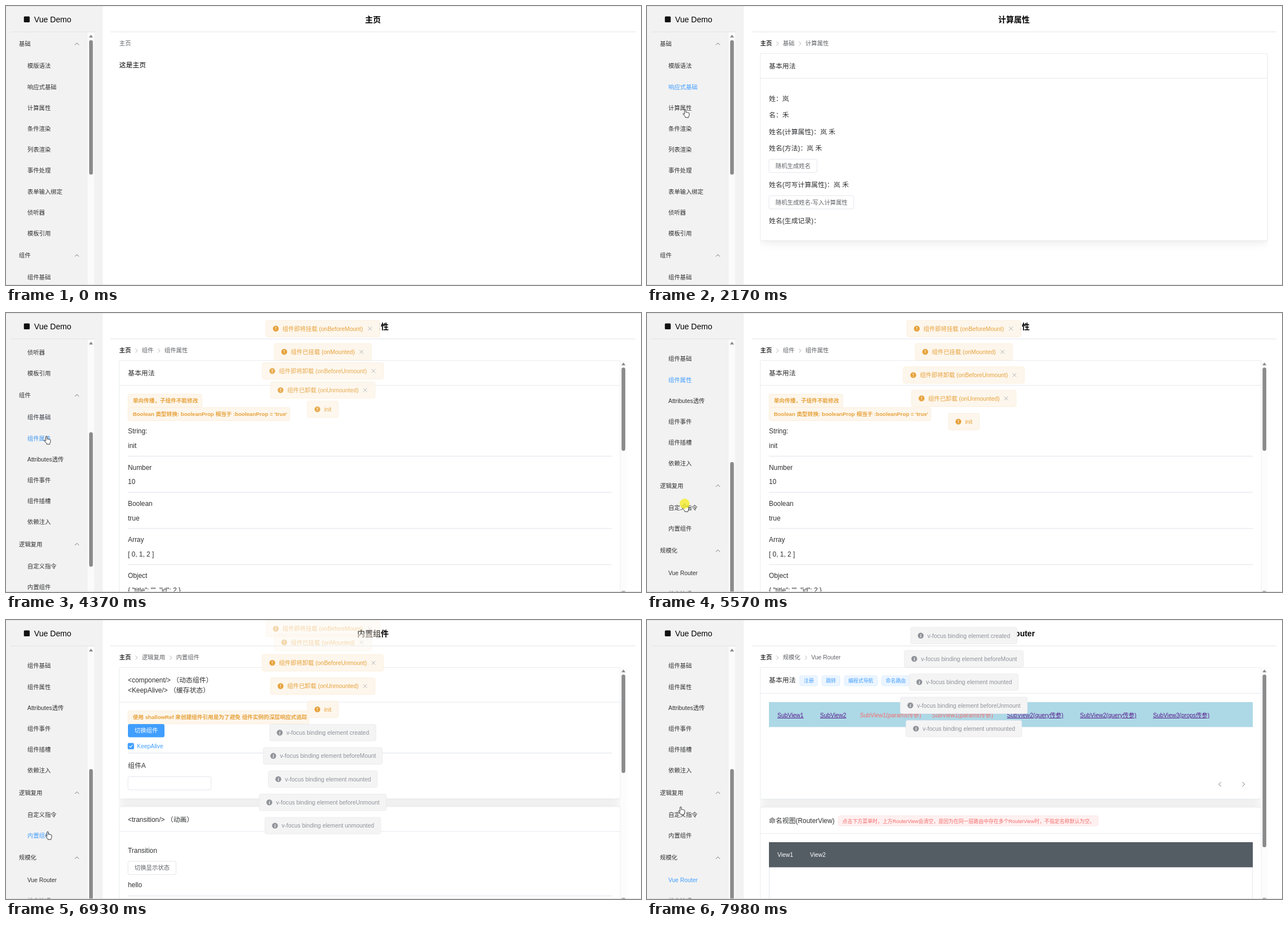
An HTML page for the animation above (8000 ms loop, 1130 by 496 pixels).

```html
<!DOCTYPE html>
<html lang="zh-CN">
<head>
<meta charset="utf-8">
<title>Vue Demo</title>
<style>
  html, body { margin: 0; width: 100%; height: 100%; overflow: hidden; background: #fff; }
  svg { display: block; width: 100vw; height: 100vh; }
  text { font-family: "Liberation Sans", "Noto Sans CJK SC", "Noto Sans CJK", sans-serif; white-space: pre; }
  .card { fill: #fff; stroke: #e4e7ed; filter: drop-shadow(0 0 9px rgba(0, 0, 0, .12)); }
</style>
</head>
<body>
<svg id="stage" viewBox="0 0 1130 496"></svg>
<script>
const LOOP = 8000;
const INK = '#303133', GREY = '#606266', BLUE = '#409eff', ORANGE = '#e6a23c', RED = '#f56c6c';
const SMALL = 10.4, BODY = 11.9, TINY = 8.93;

// ---------- drawing helpers (text is placed by its vertical centre) ----------
const escapeText = s => s.replace(/&/g, '&amp;').replace(/</g, '&lt;');
const text = (x, y, s, size = BODY, fill = INK, more = '') =>
  `<text x="${x}" y="${y + size * .37}" font-size="${size}" fill="${fill}" ${more}>${escapeText(s)}</text>`;
const box = (x, y, w, h, fill, stroke = 'none', r = 3) =>
  `<rect x="${x}" y="${y}" width="${w}" height="${h}" rx="${r}" fill="${fill}" stroke="${stroke}" stroke-width=".8"/>`;
const line = (x1, x2, y, color = '#dcdfe6') => `<path d="M${x1} ${y}H${x2}" stroke="${color}" stroke-width=".9"/>`;
const stroke = (d, color, w = .9) => `<path d="${d}" fill="none" stroke="${color}" stroke-width="${w}"/>`;
const bold = 'font-weight="700"';

const chevronRight = (x, y, s, color) => stroke(`M${x - s / 2} ${y - s}l${s} ${s}l${-s} ${s}`, color);
const card = (y, bottom, headerLine, right = 1104) =>
  `<rect class="card" x="201.5" y="${y}" width="${right - 201.5}" height="${bottom - y}" rx="3" stroke-width=".8"/>` +
  line(201.5, right, headerLine, '#e4e7ed');
const button = (x, y, w, label) => box(x, y, w, 23.6, '#fff', '#dcdfe6') + text(x + 11.8, y + 11.6, label, SMALL, GREY);
const alertBox = (y, w, label) =>
  box(217, y, w, 23.4, '#fdf6ec', '#faecd8') + text(225.7, y + 11.6, label, 9.67, ORANGE, bold);
const arrowUp = (x, y) => `<path d="M${x - 3.6} ${y + 2.6}L${x} ${y - 2.6}L${x + 3.6} ${y + 2.6}Z" fill="#8b8b8b"/>`;
const scrollbar = thumb => box(1093.5, 84, 11, 412, '#fcfcfc', 'none', 0) + arrowUp(1098.7, 90.5) +
  box(1095.4, 97, 6.6, thumb, '#8b8b8b', 'none', 3.3) +
  '<path d="M1095.2 494h7l-3.5 5z" fill="#8b8b8b"/>';

// ---------- pages ----------
const counters = y => [217, 358.3, 499.4].map(x => button(x, y, 132, 'You clicked me 0 times.')).join('');

const computedPage = () => card(84.5, 417, 128.5) + text(217, 107, '基本用法') +
  [[165, '姓：岚'], [194, '名：禾'], [223.5, '姓名(计算属性)：岚 禾'], [253, '姓名(方法)：岚 禾'],
   [317.5, '姓名(可写计算属性)：岚 禾'], [382, '姓名(生成记录)：']].map(([y, s]) => text(217, y, s)).join('') +
  button(217, 272.4, 85.6, '随机生成姓名') + button(217, 337.2, 151, '随机生成姓名-写入计算属性');

const basicsPage = () => card(84.5, 183, 128.5) + text(217, 107, 'SFC单组件') + counters(144) +
  card(197.3, 320, 241.5) + text(217, 220, 'Js对象定义组件') + counters(280.6) +
  card(333.8, 426.5, 378.5) + text(217, 357, '全局注册组件') + text(217, 403, '这是个全局组件');

const propsPage = () => card(84.5, 560, 128.5, 1093) + text(217, 107, '基本用法') +
  alertBox(144.2, 131.5, '单向传播，子组件不能修改') +
  alertBox(168, 288, "Boolean 类型转换: booleanProp 相当于 :booleanProp = 'true'") +
  [['String:', 'init'], ['Number', '10'], ['Boolean', 'true'], ['Array', '[ 0, 1, 2 ]'],
   ['Object', '{ "title": "", "id": 2 }']].map(([type, value], i) => {
    const y = 210 + 64.25 * i;
    return text(217, y, type) + text(217, y + 25.6, value) + line(217, 1078, y + 44.5);
  }).join('') + scrollbar(148);

const builtinPage = () => card(84.5, 318, 146, 1093) +
  text(217, 107, '<component/> （动态组件）') + text(217, 124.6, '<KeepAlive/> （缓存状态）') +
  alertBox(161.3, 322, '使用 shallowRef 来创建组件引用是为了避免 组件实例的深层响应式追踪') +
  box(217, 185, 65, 23.6, BLUE) + text(228.8, 196.5, '切换组件', SMALL, '#fff', 'font-weight="500"') +
  box(217, 219, 10.4, 10.4, BLUE, BLUE, 1.5) + stroke('M219.4 224.2l2 2.2l3.8 -4.2', '#fff', 1.1) +
  text(233, 223.8, 'KeepAlive', SMALL, BLUE) + line(217, 1078, 236.5) +
  text(217, 258.5, '组件A') + box(217, 278.5, 148, 23.4, '#fff', '#dcdfe6') +
  card(331.8, 560, 376, 1093) + text(217, 355, '<transition/> （动画）') + text(217, 410, 'Transition') +
  button(217, 429, 85.6, '切换显示状态') + text(217, 471, 'hello') + line(217, 1078, 490.5) + scrollbar(175);

const routerPage = () => card(84.5, 318.5, 130.3, 1093) + text(217, 107, '基本用法') +
  [[271.8, 31.8, '注册'], [311.2, 32, '跳转'], [351, 59, '编程式导航'], [417.6, 50.5, '命名路由']]
    .map(([x, w, s]) => box(x, 99, w, 18, '#ecf5ff', '#d9ecff') + text(x + 7.2, 108, s, TINY, BLUE)).join('') +
  box(217, 146, 861, 44.3, '#add8e6', 'none', 0) +
  [[232, 'SubView1'], [308, 'SubView2'], [379, 'SubView1(params传参)'], [507, 'SubView1(params传参)'],
   [640.6, 'SubView2(query传参)'], [770.6, 'SubView2(query传参)'], [900.6, 'SubView3(props传参)']]
    .map(([x, s]) => s.includes('params') ? text(x, 169, s, SMALL, RED)
      : text(x, 169, s, SMALL, '#551a8b', 'text-decoration="underline"')).join('') +
  stroke('M1021.5 288l-4 4l4 4', GREY) + chevronRight(1061.5, 292, 4, GREY) +
  card(332.8, 560, 379.5, 1093) + text(217, 356.8, '命名视图(RouterView)') +
  box(340.4, 348, 462.5, 18, '#fef0f0', '#fde2e2') +
  text(347.8, 357.2, '点击下方菜单时，上方RouterView会清空，是因为在同一层路由中存在多个RouterView时，不指定名称默认为空。', TINY, RED) +
  box(217.4, 430, 860.2, 90, '#fff', '#dcdfe6', 0) + box(217, 395, 861, 44.6, '#545c64', 'none', 0) +
  text(232, 417, 'View1', SMALL, '#fff') + text(290, 417, 'View2', SMALL, '#fff') + scrollbar(307);

const simplePage = bottom => () => card(84.5, bottom, 128.5) + text(217, 107, '基本用法');

const pages = [
  { at: 0, path: [], title: '主页', body: () => text(201.5, 105, '这是主页', BODY, '#000') },
  { at: 1100, path: ['基础'], title: '模版语法', body: simplePage(560) },
  { at: 1560, path: ['基础'], title: '响应式基础', body: simplePage(417) },
  { at: 2160, path: ['基础'], title: '计算属性', body: computedPage },
  { at: 3510, path: ['组件'], title: '组件基础', body: basicsPage },
  { at: 4150, path: ['组件'], title: '组件属性', body: propsPage },
  { at: 5630, path: ['逻辑复用'], title: '自定义指令', body: simplePage(318) },
  { at: 6060, path: ['逻辑复用'], title: '内置组件', body: builtinPage },
  { at: 7640, path: ['规模化'], title: 'Vue Router', body: routerPage },
];

function pageMarkup({ path, title, body }) {
  let x = 201.5, crumbs = '';
  const trail = path.length ? ['主页', ...path, title] : [title];
  trail.forEach((name, i) => {
    const home = trail.length > 1 && i === 0;
    crumbs += text(x, 66.5, name, SMALL, home ? INK : GREY, home ? bold : '');
    x += name.length * SMALL + 19.4;
    if (i < trail.length - 1) crumbs += chevronRight(x - 9.6, 67, 3.6, '#a8abb2');
  });
  return `<g class="page">${text(653, 23.5, title, 14, '#000', bold + ' text-anchor="middle"')}${crumbs}
    <g clip-path="url(#mainClip)">${body()}</g></g>`;
}

// ---------- side menu ----------
const menu = {
  基础: ['模版语法', '响应式基础', '计算属性', '条件渲染', '列表渲染', '事件处理', '表单输入绑定', '侦听器', '模板引用'],
  组件: ['组件基础', '组件属性', 'Attributes透传', '组件事件', '组件插槽', '依赖注入'],
  逻辑复用: ['自定义指令', '内置组件'],
  规模化: ['Vue Router', '状态管理'],
};
function menuMarkup() {
  let y = 67.3, out = '';
  for (const [group, items] of Object.entries(menu)) {
    out += text(23, y, group, SMALL) + stroke(`M122.6 ${y + 2}l3.6 -3.6l3.6 3.6`, GREY);
    y += 39.25;
    items.forEach((name, i) => {
      out += text(38, y, name, SMALL, INK, `data-item="${name}"`);
      y += i < items.length - 1 ? 37.2 : 39.25;
    });
  }
  return out;
}

// ---------- messages ----------
const PITCH = 41.35, FIRST_Y = 27.7, HEIGHT = 29.4;
const batches = [
  { at: 3550, close: 6830, items: [['组件即将挂载 (onBeforeMount)', 203], ['组件已挂载 (onMounted)', 173]] },
  { at: 4190, close: 7175, items: [['组件即将卸载 (onBeforeUnmount)', 215.5], ['组件已卸载 (onUnmounted)', 186], ['init', 55]] },
  { at: 5660, items: [['v-focus binding element created', 189], ['v-focus binding element beforeMount', 212], ['v-focus binding element mounted', 194]] },
  { at: 6090, items: [['v-focus binding element beforeUnmount', 226], ['v-focus binding element unmounted', 206]] },
];
const messages = [];
batches.forEach(batch => {
  const first = messages.length;
  batch.items.forEach(([label, width], k) => messages.push({ batch, first, k, label, width }));
});
function messageMarkup({ label, width }) {
  const info = label.startsWith('v-'), color = info ? '#909399' : ORANGE, left = 563.8 - width / 2, right = left + width;
  const mark = info ? '<path d="M.4 -2.8v1M-.4 -.7h.8l-.5 3.4h.8" ' : '<path d="M0 -3v3.4M0 1.7v1.2" ';
  return `<g class="message">` +
    (info ? box(left, -HEIGHT / 2, width, HEIGHT, '#f4f4f5', '#e9e9eb') : box(left, -HEIGHT / 2, width, HEIGHT, '#fdf6ec', '#faecd8')) +
    `<g transform="translate(${left + 17.8})"><circle r="5.2" fill="${color}"/>${mark} fill="none" stroke="#fff" stroke-width="1.1"/></g>` +
    text(left + 29.6, 0, label, SMALL, color) +
    (label.startsWith('组件') ? stroke(`M${right - 21} -3.3l6.6 6.6m0 -6.6l-6.6 6.6`, '#a8abb2') : '') + '</g>';
}

// ---------- scene ----------
const stage = document.getElementById('stage');
stage.innerHTML = `
  <clipPath id="mainClip"><rect x="201" y="84" width="904" height="412"/></clipPath>
  <clipPath id="menuClip"><rect y="47" width="172" height="449"/></clipPath>
  <rect width="1130" height="496" fill="#fff"/><rect width="172" height="496" fill="#f2f2f2"/>
  ${box(31.8, 18.6, 10.4, 10.4, '#111', 'none', 1.5)}${text(50, 23.6, 'Vue Demo', 14.1, '#000')}
  ${line(8, 158, 46)}${line(186, 1120, 46)}
  <g clip-path="url(#menuClip)">
    <g id="menu">${menuMarkup()}</g>
    ${box(145.3, 47, 11.7, 449, '#fbfbfb', 'none', 0)}${arrowUp(151.2, 53.5)}
    <g id="thumb">${box(148, 60.8, 6.6, 239, '#8b8b8b', 'none', 3.3)}</g>
  </g>
  ${pages.map(pageMarkup).join('')}
  ${messages.map(messageMarkup).join('')}
  ${line(0, 1130, .6, '#e2e2e2')}${line(0, 1130, 495.4, '#dcdcdc')}
  <g id="cursor" stroke="#222" stroke-width=".9" stroke-linejoin="round" fill="#fff">
    <path id="arrow" d="M0 0v11.5l2.7 -2.5l1.8 4l1.8 -.8l-1.8 -3.9h3.6z"/>
    <path id="hand" d="M-1.2 .8q1.2 -1.7 2.4 0v4.4q1 -1 2 .2q1 -.8 2 .4q1.4 -.6 1.9 .8v3.2q0 1.7 -1.2 3v1.4h-5.6v-1.2l-4 -4.6q-.6 -1.6 1 -1.3l1.5 1.4z"/>
    <circle id="press" r="9" fill="#f5ee2c" fill-opacity=".8" stroke="none"/>
  </g>`;

const $ = id => document.getElementById(id);
const pageNodes = stage.querySelectorAll('.page');
const messageNodes = stage.querySelectorAll('.message');
const itemNodes = [...stage.querySelectorAll('[data-item]')];

// ---------- motion ----------
const clamp = v => Math.min(1, Math.max(0, v));
const mix = (a, b, p) => a + (b - a) * p;
// CSS "ease": cubic-bezier(.25, .1, .25, 1)
function ease(v) {
  const x = clamp(v);
  if (x === 0 || x === 1) return x;
  let lo = 0, hi = 1, s;
  for (let i = 0; i < 18; i++) {
    s = (lo + hi) / 2;
    const bx = .75 * s * (1 - s) + s ** 3;
    if (bx < x) lo = s; else hi = s;
  }
  return .3 * s * (1 - s) ** 2 + 3 * s * s * (1 - s) + s ** 3;
}
const wheel = [[2480, 99], [2750, 99], [3050, 99], [4550, 104]];
const scrollAt = t => wheel.reduce((sum, [at, d]) => sum + d * ease((t - at) / 220), 0);

// time, x, y of the pointer tip
const route = [
  [110, 1122, 470], [860, 96, 116], [1000, 74, 106], [1120, 74, 106], [1430, 68, 143], [1600, 68, 143],
  [2060, 68, 184], [2560, 68, 184], [3300, 70, 183], [3520, 70, 183], [3620, 72, 218], [5100, 72, 220],
  [5500, 67, 339], [5650, 67, 339], [5920, 66, 378], [6090, 66, 378], [6500, 76, 362], [6800, 76, 362],
  [7340, 64, 457], [7660, 64, 457], [7970, 60, 332],
];
function pointerAt(t) {
  const i = route.findIndex(p => p[0] > t);
  if (i < 0) return route.at(-1).slice(1);
  const a = route[Math.max(0, i - 1)], b = route[i];
  const p = clamp((t - a[0]) / (b[0] - a[0])), q = p * p * (3 - 2 * p);
  return [mix(a[1], b[1], q), mix(a[2], b[2], q)];
}

const activeLevel = (t, page, next) =>
  ease((t - page.at - 20) / 300) * (1 - (next ? ease((t - next.at - 20) / 300) : 0));
const blend = p => `rgb(${[[48, 64], [49, 158], [51, 255]].map(([a, b]) => Math.round(mix(a, b, p)))})`;

function placeMessage(node, m, index, t) {
  const { at, close = Infinity } = m.batch;
  const shown = t >= at && t < close + 400;
  node.style.display = shown ? '' : 'none';
  if (!shown) return;
  const closed = batches.reduce((n, b) =>
    b.close && b !== m.batch ? n + b.items.length * ease((t - b.close) / 400) : n, 0);
  const home = FIRST_Y + PITCH * (index - closed);
  const start = FIRST_Y + PITCH * m.first + 11.9 * m.k - HEIGHT;
  const entering = mix(start, home, ease((t - at) / 400));
  const y = mix(entering, FIRST_Y - HEIGHT, ease((t - close) / 400));
  node.setAttribute('transform', `translate(0 ${y})`);
  node.setAttribute('opacity', ease((t - at) / 300) * (1 - ease((t - close) / 300)));
}

function render(t) {
  const current = pages.findLastIndex(p => t >= p.at);
  pageNodes.forEach((n, i) => n.style.display = i === current ? '' : 'none');

  const scroll = scrollAt(t);
  $('menu').setAttribute('transform', `translate(0 ${-scroll})`);
  $('thumb').setAttribute('transform', `translate(0 ${scroll * .509})`);
  itemNodes.forEach(n => {
    const i = pages.findIndex(p => p.title === n.dataset.item);
    n.setAttribute('fill', i < 0 ? INK : blend(activeLevel(t, pages[i], pages[i + 1])));
  });

  messages.forEach((m, i) => placeMessage(messageNodes[i], m, i, t));

  const [x, y] = pointerAt(t);
  const overMenu = x < 145;
  $('cursor').style.display = t < 110 ? 'none' : '';
  $('cursor').setAttribute('transform', `translate(${x} ${y})`);
  $('arrow').style.display = overMenu ? 'none' : '';
  $('hand').style.display = overMenu ? '' : 'none';
  $('press').style.display = pages.some(p => p.at && t >= p.at - 130 && t < p.at) ? '' : 'none';
}

const begin = performance.now();
(function frame() {
  render((performance.now() - begin) % LOOP);
  requestAnimationFrame(frame);
})();
</script>
</body>
</html>
```
